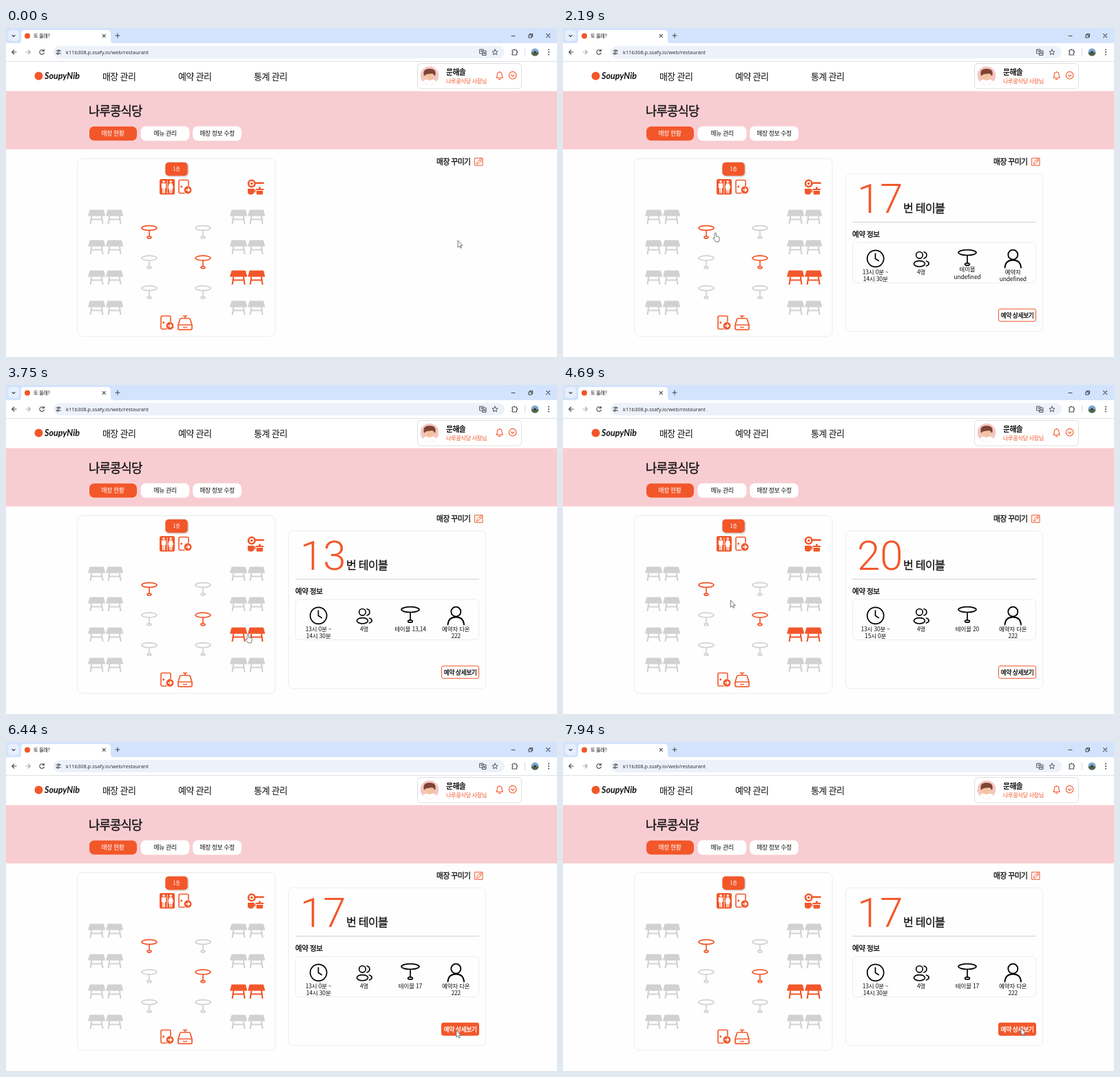
These frames come from a looping animation (800 px wide and 477 px high, 8000 ms). An HTML page:

```html
<!DOCTYPE html>
<html lang="ko">
<head>
<meta charset="utf-8">
<title>매장 관리</title>
<style>
html, body { margin: 0; width: 100%; height: 100%; overflow: hidden; background: #fefefe; }
svg { display: block; width: 800px; height: 477px; }
text { font-family: "Noto Sans CJK KR", "Noto Sans CJK", sans-serif; letter-spacing: -.05em; color: #111; fill: currentColor; }
.latin { font-family: "Noto Sans", "Open Sans", sans-serif; letter-spacing: 0; }
.mid { text-anchor: middle; }
.med { stroke: currentColor; stroke-width: .3; }
.small { font-size: 8.5px; letter-spacing: -.02em; text-anchor: middle; }
.line { fill: none; stroke: currentColor; stroke-linecap: round; stroke-linejoin: round; }
.zoom { transform-box: fill-box; transform-origin: center; }
.or { color: #f2572a; }
.gr { color: #d1d1d1; }
.ui { color: #44474c; stroke-width: 1.1; }
.box { fill: #fefefe; stroke: #ececee; }
#floor rect { filter: drop-shadow(1px 1px 1px #0004); }
#num { font-family: Roboto, "Noto Sans", sans-serif; font-weight: 300; letter-spacing: 0; color: #f2572a; }
</style>
</head>
<body>
<svg viewBox="0 0 800 477">
  <defs>
    <g id="bench" fill="currentColor">
      <path d="M3.4 .5H22Q22.8 .5 23 1.2L25 8.6Q25.2 9.8 24 9.8H1.2Q0 9.8 .3 8.6L2.4 1.2Q2.6 .5 3.4 .5Z"/>
      <path d="M4.2 9.8H6.2L5.9 13.6H19.3L18.9 9.8H20.9L22.6 21H20.5L19.6 15.5H5.6L4.6 21H2.5Z"/>
    </g>
    <g id="pair"><use href="#bench"/><use href="#bench" x="26"/></g>
    <g id="round" class="line" stroke-width="1.7">
      <ellipse rx="11" ry="3.4"/><path d="M0 3.4V12"/><ellipse cy="13.6" rx="3" ry="1.5"/>
    </g>
    <g id="door" class="line" stroke-width="1.6">
      <path d="M9 20H3Q1 20 1 18V3Q1 1 3 1H13Q15 1 15 3V9"/>
      <circle cx="4.7" cy="10.5" r=".7"/>
      <circle cx="14" cy="15.3" r="5.5" fill="currentColor" stroke="none"/>
      <path d="M11.5 15.3H16.5M14.4 13L16.7 15.3 14.4 17.6" stroke="#fff" stroke-width="1.4"/>
    </g>
  </defs>

  <!-- browser -->
  <path fill="#d3e3fd" d="M0 0H800V23H0Z"/>
  <path fill="#fff" d="M0 22H18Q22 22 22 18V8Q22 3 27 3H147Q152 3 152 8V18Q152 22 156 22H800V48H0Z"/>
  <rect x="3" y="3" width="16" height="16" rx="5" fill="#e6effd"/>
  <rect x="69" y="26" width="655" height="18" rx="9" fill="#edf1fa"/>
  <path stroke="#dfe1e5" d="M0 48.5H800"/>
  <circle cx="31" cy="11.5" r="4" fill="#f2572a"/>
  <text x="40" y="14.3" font-size="7.2">또 올래?</text>
  <text class="latin" x="87" y="37.8" font-size="7.4" style="color:#333">k11b308.p.ssafy.io/web/restaurant</text>
  <g class="line ui">
    <path d="M9 10.5L11 12.5 13 10.5M140.3 9.3L144.3 13.3M144.3 9.3L140.3 13.3M162 8V14M159 11H165"/>
    <path d="M734 11.5H739M759 10H763V14H759ZM760.5 10V8.5H764.5V12.5H763M784.7 8.7L789.7 13.7M789.7 8.7L784.7 13.7"/>
    <path d="M15 35H9M11.7 32L8.7 35 11.7 38"/>
    <path d="M29 35H35M32.3 32L35.3 35 32.3 38" stroke="#a9abb0"/>
    <path d="M54.7 33A3.3 3.3 0 1 0 55.3 36M55.3 31V33.5H52.8"/>
    <path d="M73 33H75M78 33H79.5M73 37H74M77 37H79.5"/><circle cx="76.5" cy="33" r="1.2"/><circle cx="75.3" cy="37" r="1.2"/>
    <path d="M688 31H693V37H688ZM693 33H697V39.5H691.5V37M689.3 33.2H691.7M690.5 33.2L691.5 35M694 37.5L695 35 696 37.5" stroke-width=".9"/>
    <path d="M710 31L711.2 33.7 714 34 711.9 35.9 712.5 38.7 710 37.2 707.5 38.7 708.1 35.9 706 34 708.8 33.7Z" stroke-width=".9"/>
    <path d="M735 32H737Q738 29.5 739 32H741.5V34.2Q744 35 741.5 36.2V39H735V36.7Q737 35.5 735 34.3Z"/>
    <path d="M753.5 30V40" stroke="#cfdcf3"/>
  </g>
  <circle cx="768" cy="35" r="5.5" fill="#7fa9cf"/>
  <path fill="#536447" d="M762.6 36Q768 33 773.4 36A5.5 5.5 0 0 1 762.6 36Z"/>
  <circle cx="768" cy="35" r="1.8" fill="#2f3c4e"/>
  <g fill="#44474c"><circle cx="788" cy="31.5" r="1"/><circle cx="788" cy="35" r="1"/><circle cx="788" cy="38.5" r="1"/></g>

  <!-- page header -->
  <path fill="#fff" d="M0 49H800V91H0Z"/>
  <circle cx="47.5" cy="69.5" r="6" fill="#f2572a"/>
  <text x="56" y="74" font-size="12.5" style="font-family:Lato,sans-serif;font-weight:700;font-style:italic;letter-spacing:0">SoupyNib</text>
  <g font-size="13">
    <text x="140" y="74.5">매장 관리</text><text x="250" y="74.5">예약 관리</text><text x="360" y="74.5">통계 관리</text>
  </g>
  <rect x="597.5" y="51.5" width="151" height="36.5" rx="5" fill="#fff" stroke="#dedede"/>
  <circle cx="615" cy="69" r="13.3" fill="#f5c6c3"/>
  <path fill="#fff" d="M605 77.7Q608 74 615 74T625 77.7A13.3 13.3 0 0 1 605 77.7Z"/>
  <circle cx="615" cy="69.5" r="6.5" fill="#f3c3a0"/>
  <path fill="#7e4435" d="M607 70Q604 59 615 59T623 70Q621 67 619 66L611 67Q608 68 607 70Z"/>
  <text x="639" y="68" font-size="10.8" font-weight="700">문해솔</text>
  <text x="639" y="79.7" font-size="8.2" style="color:#f2572a">나루콩식당 사장님</text>
  <g class="line or" stroke-width="1.1">
    <path d="M712 72.2Q713.3 71 713.3 67.5Q713.3 64 716.6 64T720 67.5Q720 71 721.3 72.2ZM715.3 74Q716.6 75.2 718 74M716.6 64V63"/>
    <circle cx="735.6" cy="68.7" r="5.3"/><path d="M733.2 67.8L735.6 70.2 738 67.8"/>
  </g>

  <path fill="#f8cdd2" d="M0 91.5H800V176H0Z"/>
  <text class="med" x="120" y="126.5" font-size="17.8">나루콩식당</text>
  <rect x="121" y="142.7" width="69" height="20.6" rx="7" fill="#f2572a"/>
  <rect x="195.7" y="142.5" width="70.6" height="21" rx="7" fill="#fff"/>
  <rect x="271.2" y="142.5" width="70.6" height="21" rx="7" fill="#fff"/>
  <g class="mid" font-size="8.9">
    <text x="155" y="156.3" style="color:#fff">매장 현황</text><text x="231" y="156.3">메뉴 관리</text><text x="306.5" y="156.3">매장 정보 수정</text>
  </g>

  <text class="med" x="625" y="198" font-size="10.8">매장 꾸미기</text>
  <path class="line or" stroke-width="1" d="M681 188.7H692V199.3H681ZM683.5 197L684 194.5 689.3 189.5 691.3 191.3 686 196.5ZM687.5 191.2L689.5 193.2"/>

  <!-- floor plan -->
  <rect class="box" x="103.5" y="189.5" width="287.5" height="257.5" rx="7"/>
  <g id="floor" class="zoom">
    <rect x="231.3" y="194.7" width="32.4" height="19.6" rx="5" fill="#f2572a"/>
    <text class="mid" x="247.5" y="207" font-size="7.2" style="color:#fff">1층</text>
  </g>
  <rect x="223" y="219" width="22" height="22.5" rx="2.5" fill="#f2572a"/>
  <g fill="#fff">
    <circle cx="229" cy="222.8" r="1.7"/><path d="M225.8 225.2H232.2V232H231V239.5H229.4V233H228.6V239.5H227V232H225.8Z"/>
    <path d="M233.7 221H234.5V240H233.7Z"/>
    <circle cx="239.2" cy="222.8" r="1.7"/><path d="M237.2 225.2H241.2L243.2 231.5 242 232 241 229.5 242.4 234.5H241.2V239.5H239.7V234.5H238.8V239.5H237.3V234.5H236L237.4 229.5 236.4 232 235.2 231.5Z"/>
  </g>
  <g class="or">
    <use href="#door" x="250" y="219.5"/>
    <use href="#door" x="224" y="416.5"/>
    <g class="line" stroke-width="2.6"><circle cx="356.7" cy="225.5" r="4.7"/><path d="M363 224.7H373.5"/></g>
    <circle cx="356.7" cy="225.5" r="1.8" fill="currentColor"/>
    <path fill="currentColor" d="M351 233H360V238Q360 241.5 355.5 241.5T351 238ZM362.5 233H374V235H362.5ZM363.5 236H373V240Q373 241.5 371.5 241.5H365Q363.5 241.5 363.5 240ZM367 230.5H369.7V233H367Z"/>
    <path class="line" stroke-width="1.4" d="M360 235H361.5V237.5H360"/>
    <g class="line" stroke-width="1.7">
      <path d="M250 430.5L252.5 422.5Q253 421 254.5 421H265.5Q267 421 267.5 422.5L270 430.5V436Q270 437.3 268.7 437.3H251.3Q250 437.3 250 436ZM250.5 430.5H269.5M260 421V418M257.5 417.5H262.5"/>
      <path d="M257.5 433.7Q260 435 262.5 433.7" stroke-width="1.4"/>
    </g>
  </g>
  <g id="tables"></g>

  <!-- reservation -->
  <g id="panel">
    <rect class="box" x="410.5" y="211.5" width="286" height="228.5" rx="6"/>
    <text id="num" x="427" y="268" font-size="60"></text>
    <text class="med" x="494" y="267" font-size="16.2">번 테이블</text>
    <path stroke="#d2d2d2" d="M420 281.5H687"/>
    <text class="med" x="420" y="302.7" font-size="10.7">예약 정보</text>
    <rect class="box" x="420.5" y="311" width="266" height="58.5" rx="5"/>
    <g class="card zoom">
      <g class="line" stroke-width="1.7"><circle cx="453.7" cy="334.3" r="12"/><path d="M453.5 327V334.5L458.3 337.5"/></g>
      <text class="small" x="453.7"></text><text class="small" x="453.7"></text>
    </g>
    <g class="card zoom">
      <g class="line" stroke-width="1.6"><circle cx="517.5" cy="329.3" r="4.8"/><ellipse cx="517.5" cy="341.8" rx="8" ry="4.2"/><path d="M524 324.7Q528 325.5 528 329.3T524 334M527.5 338Q531.2 339 531.2 341.5T527.5 345"/></g>
      <text class="small" x="520"></text><text class="small" x="520"></text>
    </g>
    <g class="card zoom">
      <g class="line" stroke-width="1.7"><ellipse cx="587" cy="325.6" rx="13" ry="3.9"/><path d="M587 329.5V340.8"/><ellipse cx="587" cy="342.5" rx="3.4" ry="1.7"/></g>
      <text class="small" x="587"></text><text class="small" x="587"></text>
    </g>
    <g class="card zoom">
      <g class="line" stroke-width="1.8"><circle cx="653.3" cy="328.7" r="7"/><path d="M641.5 347.5Q642.3 336.5 653.3 336.5T665 347.5"/></g>
      <text class="small" x="653.3"></text><text class="small" x="653.3"></text>
    </g>
    <rect id="btn" x="632.5" y="407.3" width="54" height="18" rx="2.5" stroke="#f2572a"/>
    <text id="btnText" class="mid med" x="659.5" y="419.6" font-size="8.8">예약 상세보기</text>
  </g>

  <g id="cursor" stroke-width=".8" stroke-linejoin="round" fill="#fff" stroke="#555">
    <path id="arrow" d="M0 0V10L2.3 8 3.9 11.2 5.4 10.5 3.9 7.4H6.8Z"/>
    <path id="hand" d="M2 1.2A1.2 1.2 0 0 1 4.4 1.2V5L8.2 5.8Q9.5 6.2 9.3 7.6L8.7 11Q8.5 12 8 13H3.8L.4 8.8Q-.4 7.4 1 7.2L2 8Z"/>
  </g>
</svg>
<script>
const $ = id => document.getElementById(id);
const LOOP = 8000, STEP = 62.5;

const use = (shape, x, y, on) => `<use href="#${shape}" x="${x}" y="${y}" class="${on ? 'or' : 'gr'}"/>`;
let plan = '';
for (let r = 0; r < 4; r++) {
  plan += use('pair', 119, 263 + r * 44, false) + use('pair', 325, 263 + r * 44, r === 2);
  if (r < 3) plan += use('round', 208, 290 + r * 43.6, r === 0) + use('round', 286, 290 + r * 43.6, r === 1);
}
$('tables').innerHTML = plan;

// time, x, y of the pointer
const path = [
  [0, 656, 308], [870, 656, 308], [1150, 585, 324], [1500, 330, 312], [1800, 218, 297], [2440, 218, 297],
  [2850, 275, 370], [3150, 338, 398], [3400, 348, 361], [3800, 348, 361], [4150, 287, 342], [4320, 287, 342],
  [4690, 243, 312], [4880, 213, 297], [5250, 213, 297], [5750, 257, 198], [6000, 400, 290], [6400, 640, 412],
  [6580, 662, 416], [6750, 600, 392], [7060, 463, 343], [7350, 590, 345], [7560, 676, 378], [7800, 665, 415], [8000, 665, 415]
];

const same = (a, b) => a[1] === b[1] && a[2] === b[2];
function slope(i, k) {
  const a = path[i - 1], p = path[i], b = path[i + 1];
  return !a || !b || same(a, p) || same(p, b) ? 0 : (b[k] - a[k]) / (b[0] - a[0]);
}
function pointer(t) {
  t = Math.max(0, t);
  let i = 0;
  while (i < path.length - 2 && t >= path[i + 1][0]) i++;
  const a = path[i], b = path[i + 1], d = b[0] - a[0], u = (t - a[0]) / d, v = 1 - u;
  return [1, 2].map(k => v * v * (1 + 2 * u) * a[k] + u * u * (3 - 2 * u) * b[k]
    + u * v * d * (v * slope(i, k) - u * slope(i + 1, k)));
}

const inside = ([x, y], [l, t, r, b]) => x >= l && x <= r && y >= t && y <= b;
const floorZone = [230, 193, 265, 216], btnZone = [632, 407, 687, 426];
const handZones = [floorZone, [196, 284, 221, 306], [273, 328, 299, 350], [324, 350, 377, 373]];
const cards = [...document.querySelectorAll('.card')];
const cardZone = i => [420 + i * 66.7, 311, 486.7 + i * 66.7, 370];

// share of a short hover transition that is done
function hover(t, zone) {
  let n = 0;
  for (let k = 0; k < 8; k++) n += inside(pointer(t - k * 15), zone);
  return n / 8;
}
const zoom = (el, amount) => el.style.transform = `scale(${1 + .055 * amount})`;

const early = ['13시 0분 ~', '14시 30분'], late = ['13시 30분 ~', '15시 0분'], guest = ['예약자 다온', '222'];
const views = [
  [2000, 17, early, ['테이블', 'undefined'], ['예약자', 'undefined']],
  [3375, 13, early, ['테이블 13,14', ''], guest],
  [4187, 20, late, ['테이블 20', ''], guest],
  [4900, 17, early, ['테이블 17', ''], guest]
];

let shown;
function show(view) {
  $('panel').style.display = view ? '' : 'none';
  if (!view || view === shown) return;
  shown = view;
  const [, num, time, table, who] = view;
  $('num').textContent = num;
  [time, ['4명', ''], table, who].forEach((lines, i) => {
    const top = i === 2 && lines[1] ? 353.3 : 357;
    cards[i].querySelectorAll('text').forEach((el, k) => {
      el.textContent = lines[k];
      el.setAttribute('y', top + k * 10.3);
    });
  });
}

function draw(now) {
  const t = Math.floor((now % LOOP + 5) / STEP) * STEP % LOOP;
  const p = pointer(t);
  show(views.filter(v => t >= v[0]).pop());
  $('cursor').setAttribute('transform', `translate(${p[0]} ${p[1]})`);
  const hand = handZones.some(z => inside(p, z));
  $('hand').style.display = hand ? '' : 'none';
  $('arrow').style.display = hand ? 'none' : '';
  zoom($('floor'), hover(t, floorZone));
  cards.forEach((el, i) => zoom(el, hover(t, cardZone(i))));
  const hot = inside(p, btnZone);
  $('btn').style.fill = hot ? '#f2572a' : '#fff';
  $('btnText').style.color = hot ? '#fff' : '#111';
}

const start = performance.now();
function tick() {
  draw(performance.now() - start);
  requestAnimationFrame(tick);
}
tick();
</script>
</body>
</html>
```
